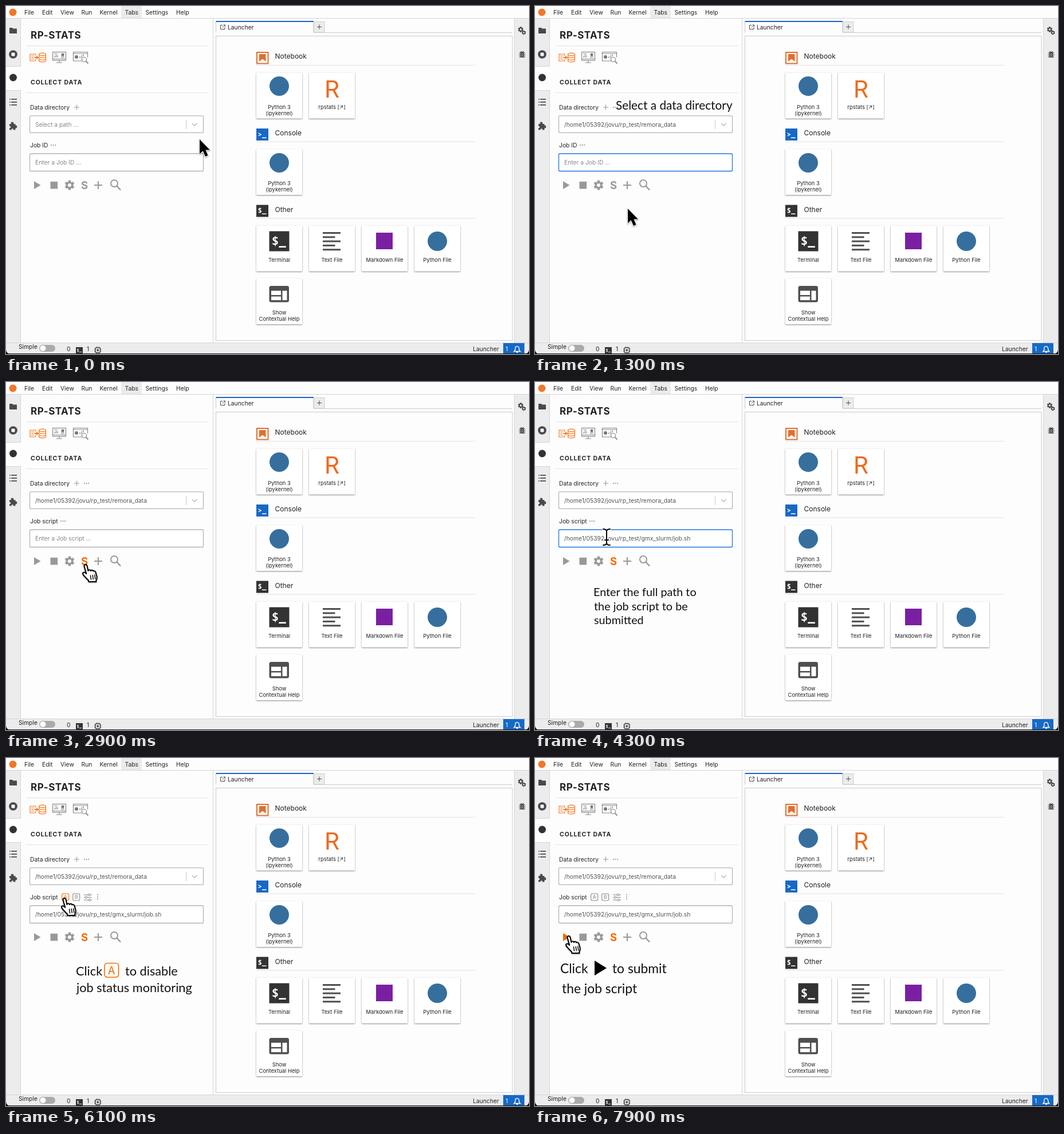
Recreate the animation shown at these times as an HTML page. Size 913x608 px, loop 8 s.

```html
<!DOCTYPE html>
<html lang="en">
<head>
<meta charset="utf-8">
<title>Collect data</title>
<style>
html, body { margin: 0; width: 100%; height: 100%; overflow: hidden; background: #fff; }
svg { display: block; width: 913px; height: 608px; }
text { font: 10.3px Inter, "Liberation Sans", sans-serif; fill: #222; white-space: pre; }
.note text { font-family: Lato, "Open Sans", sans-serif; fill: #111; }
.prompt { font-family: "Noto Sans Mono", monospace; font-weight: 600; fill: #fff; }
.mid { text-anchor: middle; }
.card { fill: #fff; filter: drop-shadow(0 1px 1.3px #0007); }
.rule { stroke: #e2e2e2; }
.box { fill: #fff; stroke: #b5b5b5; stroke-width: 1.3; }
.line { fill: none; stroke: #999; stroke-width: 1.4; }
</style>
</head>
<body>
<svg id="stage" viewBox="0 0 913 608"></svg>
<script>
const INK = '#4a4a4a', GREY = '#999', ORANGE = '#ef6c00', BLUE = '#1769c6', PAPER = '#fefdfe', BAR = '#ececec';
const HOME = '/home1/05392/jovu/rp_test/';

const rect = (x, y, w, h, fill, more = '') =>
  `<rect x="${x}" y="${y}" width="${w}" height="${h}" fill="${fill}" ${more}/>`;
const disc = (x, y, r, fill, more = '') =>
  `<circle cx="${x}" cy="${y}" r="${r}" fill="${fill}" ${more}/>`;
const path = (d, more = '') => `<path d="${d}" ${more}/>`;
const text = (x, y, s, style = '', more = '') =>
  `<text x="${x}" y="${y}" style="${style}" ${more}>${s}</text>`;
const group = (id, body, more = '') => `<g id="${id}" ${more}>${body}</g>`;
const rule = (x1, x2, y) => path(`M${x1} ${y}H${x2}`, 'class="rule"');
const dots = (x, y, r = 1, gap = 3.6, fill = '#888') =>
  [-gap, 0, gap].map(d => disc(x + d, y, r, fill)).join('');

function gear(x, y, r, fill, hole) {
  let teeth = '';
  for (let a = 0; a < 360; a += 60)
    teeth += rect(x - r * .26, y - r, r * .52, r * 2, fill, `transform="rotate(${a} ${x} ${y})"`);
  return teeth + disc(x, y, r * .76, fill) + disc(x, y, r * .36, hole);
}

function prompt(x, y, s, mark, fill) {
  return rect(x, y, s, s, fill) +
    text(x + s * .12, y + s * .7, mark, `font-size:${s * .6}px`, 'class="prompt"');
}

function card(x, y, lines, icon) {
  const base = lines.length > 1 ? 63 : 63.5;
  return rect(x, y, 80, 80, '#fff', 'class="card" rx="1"') + icon +
    lines.map((s, i) => text(x + 40, y + base + i * 11, s, 'font-size:9.4px', 'class="mid"')).join('');
}

function header(y, name, icon) {
  return icon + text(469.5, y + 12, name, 'font-size:12px') + rule(437, 819, y + 23.5);
}

const letterBox = (x, y, s, letter, color) =>
  rect(x, y, s, s, '#fff', `rx="${s * .2}" stroke="${color}" stroke-width="${s > 20 ? 1.6 : 1.1}"`) +
  text(x + s / 2, y + s * .78, letter, `font-size:${s * .76}px;fill:${color}`, 'class="mid"');

function frame() {
  const menu = [['File', 32], ['Edit', 63], ['View', 95], ['Run', 131.5], ['Kernel', 163.5],
    ['Tabs', 207.5], ['Settings', 243.5], ['Help', 297]];
  let s = rect(0, 0, 913, 608, PAPER) + rect(201, 0, 36, 21, '#ebebeb') +
    disc(12, 11, 6.5, '#f37726') + menu.map(([m, x]) => text(x, 15, m)).join('');
  // side bars and status bar
  s += rect(0, 22, 25.5, 566, BAR) + rect(0, 105, 26, 42, PAPER) +
    rect(887.5, 22, 26, 566, BAR) + rect(0, 588, 913, 19.5, BAR) +
    path('M0 21.5H913M25.5 22V105M0 105.5H26M0 147.5H26M25.5 147V588M361.5 22V588M887.5 22V588M0 588.5H913',
      'stroke="#d6d6d6" fill="none"');
  s += path('M6 38h5l1.5 1.6H19V48H6Z', `fill="${INK}"`) +
    disc(12.5, 84.5, 7.3, INK) + rect(9.6, 81.6, 5.8, 5.8, '#fff') + disc(12.5, 125, 6.5, '#333') +
    [163, 168, 173].map(y => rect(6, y - 1, 1.7, 1.7, INK) + rect(9, y - 1, 10, 1.7, INK)).join('') +
    rect(6, 206, 10.5, 10.5, INK, 'rx="1"') + disc(11, 205, 2.4, INK) + disc(17, 211, 2.4, INK) +
    disc(6.5, 211.5, 1.8, BAR) + disc(11.2, 216, 1.8, BAR);
  s += gear(898.5, 41, 4.6, INK, BAR) + gear(904, 46.5, 3.6, INK, BAR) +
    rect(898, 80, 6, 10, INK, 'rx="3"') +
    path('M896 82h10M895.5 85.5h11M896 89h10M898.5 79l1.5 2M903.5 79l-1.5 2', `stroke="${INK}" stroke-width="1.4"`) +
    path('M899.7 84h2.6M899.7 87h2.6', `stroke="${BAR}"`);
  s += text(22, 598.5, 'Simple') + rect(58, 592, 28, 12, '#aaa', 'rx="6"') + disc(64.5, 598, 5, '#fff') +
    text(106, 603, '0') + prompt(122, 596, 12, '$_', '#333') + text(141, 603, '1') +
    rect(156, 597, 8.5, 8.5, 'none', `stroke="${INK}" stroke-width="1.5" rx="1"`) + rect(158.6, 599.6, 3.3, 3.3, INK) +
    path('M158.5 595v2M162 595v2M158.5 605.5v2M162 605.5v2M154 599.5h2M154 603h2M164.5 599.5h2M164.5 603h2', `stroke="${INK}"`) +
    text(815, 603, 'Launcher') + rect(868, 589, 37, 19, BLUE) + text(872, 603, '1', 'fill:#fff') +
    path('M887 603.5q2-1.5 2-5.5a3.3 3.3 0 0 1 6.6 0q0 4 2 5.5ZM891 605h3', 'fill="none" stroke="#fff" stroke-width="1.3"');
  s += rect(0, 607, 913, 1, '#222') + path('M0 601q1 6 7 7H0ZM913 601q-1 6-7 7h7Z', 'fill="#000"');
  return s;
}

function launcher() {
  const kernel = (x, y) => disc(x, y, 17, '#366f9e');
  let s = path('M366.5 27V46.5M537 46.5H884M366.5 52.5H884V584.5H366.5Z', 'fill="none" stroke="#c9c9c9"') +
    rect(538, 27.5, 18, 18.5, BAR, 'stroke="#d0d0d0"') + path('M536.5 28V46', 'stroke="#c9c9c9"') +
    rect(366.5, 26, 170.5, 2, BLUE) + text(387, 41, 'Launcher') +
    path('M378 33.5h-3.5v7h7.5V37M379.5 33h3v3M382.5 33l-4.5 4.5', `fill="none" stroke="${INK}"`) +
    path('M543 36.5h8M547 32.5v8', `stroke="${INK}"`);
  s += header(80, 'Notebook', rect(438, 81, 19.5, 19.5, '#fff', 'stroke="#e46e2e" stroke-width="2"') +
    path('M442 84h11.5v13l-5.7-4.5L442 97Z', 'fill="#e46e2e"'));
  s += header(213.5, 'Console', prompt(437, 214, 21, '&gt;_', BLUE));
  s += header(347.5, 'Other', prompt(437, 347.5, 21, '$_', '#333'));
  s += card(437, 116.5, ['Python 3', '(ipykernel)'], kernel(477, 140)) +
    card(529, 116.5, ['rpstats [↗]'], text(569, 160, 'R', 'font:42px Roboto,sans-serif;fill:#ed6a1f', 'class="mid"')) +
    card(437, 250, ['Python 3', '(ipykernel)'], kernel(477, 274)) +
    card(437, 383.5, ['Terminal'], prompt(459.5, 393.5, 35, '$_', '#333')) +
    card(529, 383.5, ['Text File'], [395, 402.3, 409.6, 416.9, 424.2].map((y, i) =>
      rect(553, y, i % 2 ? 21.5 : 31, 3, '#4f4f4f')).join('')) +
    card(621, 383.5, ['Markdown File'], rect(646, 396, 29, 29, '#7b1fa2')) +
    card(713, 383.5, ['Python File'], kernel(753, 411)) +
    card(437, 476, ['Show', 'Contextual Help'], rect(459.5, 489, 34.5, 28.5, '#4f4f4f', 'rx="3.5"') +
      rect(463, 497.5, 17, 7.5, '#fff') + rect(463, 507.5, 17, 6.5, '#fff') + rect(482.5, 497.5, 8, 16.5, '#fff'));
  return s;
}

function panel() {
  const sheet = 'fill="none" stroke="#ef7d22" stroke-width="1.2"';
  const grey = 'fill="none" stroke="#888" stroke-width="1.2"';
  let s = text(43, 56.5, 'RP-STATS', 'font-size:17px;font-weight:650;letter-spacing:.5px') + rule(35, 354, 69.5) +
    text(43, 137, 'COLLECT DATA', 'font-size:10.5px;font-weight:650;letter-spacing:.9px') + rule(35, 354, 151.5);
  s += path('M51.5 87v-3H42v12h9.500v-3M44 87h5M44 90h4M44 93h5', sheet) +
    path('M49.500 89h3.500v-2.500l4 3.500-4 3.500v-2.500h-3.500Z', 'fill="#ef7d22"') +
    path('M57.500 84.500v11a6 2.300 0 0 0 12 0v-11M57.500 88a6 2.300 0 0 0 12 0M57.500 92a6 2.300 0 0 0 12 0'
      .replace(/a6 2/g, 'a6 2'), sheet) +
    `<ellipse cx="63.5" cy="84.5" rx="6" ry="2.3" ${sheet}/>`;
  s += rect(81.5, 80.5, 23, 14.5, '#fff', grey) +
    path('M81.5 92.5h23M93 95v3.5M88 99h10M85 90v-3M87.5 90v-5M90 90v-4M84 83.5h6M96 88h6M96 90h5', grey) + disc(99, 85, 2.5, '#777');
  s += path('M134 96h-16.5V80.5h25v9M117.5 83h25M129 91v-3M132 91v-5M135 88v-4', grey) + disc(123, 89, 3, '#777') +
    disc(136.5, 93.5, 4, '#fff', 'stroke="#888" stroke-width="1.2"') + path('M139.5 96.5l4 4', 'stroke="#888" stroke-width="1.8"');
  s += text(42, 181, 'Data directory') + path('M119 177h9M123.5 172.5v9', 'class="line" style="stroke-width:1.1"') +
    group('dirDots', dots(140.5, 177)) +
    rect(41.5, 191.8, 303, 29.5, '#fff', 'class="box" rx="2"') + text(51, 210.7, '', '', 'id="dir"') +
    path('M314.5 199V215', 'stroke="#ccc"') + path('M325 205l4.3 4.3 4.3-4.3', 'class="line" style="stroke:#bbb"');
  s += text(42, 247, '', '', 'id="jobLabel"') + group('idDots', dots(82.5, 243)) + group('jobDots', dots(99.5, 243)) +
    group('options', group('aOn', letterBox(97.7, 237, 12, 'A', ORANGE)) + group('aOff', letterBox(97.7, 237, 12, 'A', '#888')) +
      letterBox(116.7, 237, 12, 'B', '#888') +
      path('M136 239h14M136 243.5h14M136 248h14', 'stroke="#888" stroke-width="1.2"') +
      [[145, 239], [140, 243.5], [146, 248]].map(([x, y]) => disc(x, y, 1.8, '#fff', 'stroke="#888"')).join('') +
      [239, 242.7, 246.4].map(y => disc(160, y, 1, '#888')).join('')) +
    rect(41.5, 258, 303, 30.5, '#fff', 'class="box" rx="2" id="jobBox"') + text(51, 277, '', '', 'id="job"');
  s += path('M49 306l11.5 7-11.5 7Z', 'id="play"') + rect(77.5, 306.8, 12.6, 12.6, GREY) + gear(111, 313, 8.2, GREY, PAPER) +
    text(137, 319.5, 'S', 'font-size:18.5px;font-weight:700', 'class="mid" id="slurm"') +
    path('M154 313h14M161 306v14', 'class="line" style="stroke-width:2"') +
    disc(189, 310, 6, 'none', `stroke="${GREY}" stroke-width="2"`) + path('M193.5 314.5l6.5 7', `stroke="${GREY}" stroke-width="2.5"`);
  return s;
}

// Caption: start, end, font size, lines of [x, baseline, words], extra shapes
const captions = [
  [300, 2000, 20.8, [[141, 181, 'Select a data directory']], ''],
  [3300, 4550, 19.8, [[102, 374, 'Enter the full path to'], [103, 399, 'the job script to be'], [103, 423, 'submitted']], ''],
  [4600, 5500, 23, [[130, 377, 'Click'], [223, 377, 'to reveal'], [132, 408, 'more options']], dots(199.5, 371, 2.4, 8.5, '#111')],
  [5500, 7000, 21.7, [[122, 380, 'Click'], [208, 380, 'to disable'], [123, 409, 'job status monitoring']],
    letterBox(172, 358.5, 24.5, 'A', ORANGE)],
  [7100, 8000, 22.8, [[44, 376, 'Click'], [135, 376, 'to submit'], [47, 411, 'the job script']], path('M104 354l21 13-21 13Z')]
];
const captionArt = captions.map(([, , size, lines, extra], i) =>
  group('note' + i, `<g class="note">${lines.map(([x, y, s]) => text(x, y, s, `font-size:${size}px`)).join('')}</g>` + extra)).join('');

const round = 'stroke-linejoin="round" stroke-linecap="round"';
const shadow = 'style="filter:drop-shadow(0 1px 1px #0006)"';
const beam = 'M-6-14q6 0 6 4 0-4 6-4M0-10V10M-6 14q6 0 6-4 0 4 6 4M-3 5H3';
const cursorArt = group('cursor',
  group('arrow', path('M0 0V25.5L5.7 20.3 10 30 14.6 28 10.4 18.5H18Z',
    `fill="#000" stroke="#fff" stroke-width="2" paint-order="stroke" ${round}`), shadow) +
  group('hand', path('M-1.5 4c0-4 4.5-4 5.2 0l1.7 8c.5-2.5 4-2.2 4.5 0 1-2 4-1.5 4.3.6 1.5-1.4 4 0 4.3 2l2 7c.8 3-.3 5.5-1.300 7.500l.2 2H6.500l-.5-2.500c-3-3-7.500-7-9.500-10.500-1.500-3 1.500-4.600 4-2.600l1.800 1.500Z',
    `fill="#fff" stroke="#000" stroke-width="2" ${round}`) +
    path('M9.5 20l1 7M13.2 19.5l1 7M16.8 19l1 7', `stroke="#000" stroke-width="1.5" ${round}`), shadow) +
  group('beam', path(beam, `fill="none" stroke="#fff" stroke-width="4" ${round}`) +
    path(beam, `fill="none" stroke="#000" stroke-width="2" ${round}`)));

stage.innerHTML = frame() + launcher() + panel() + captionArt + cursorArt;

const $ = id => document.getElementById(id);
const show = (id, on) => { $(id).style.display = on ? '' : 'none'; };
const write = (id, s, fill) => { $(id).textContent = s; $(id).style.fill = fill; };

const route = [[0, 338, 233], [400, 325, 208], [650, 325, 208], [950, 200, 272], [1300, 162, 354], [1800, 162, 354],
  [2300, 138, 318], [2900, 138, 318], [3400, 125, 271], [4450, 125, 271], [4700, 100, 243], [5000, 100, 243],
  [6000, 101, 244], [6900, 101, 244], [7400, 58, 310], [8000, 58, 310]];

function pointer(t) {
  const i = route.findIndex(k => k[0] > t);
  const [t0, x0, y0] = route[i - 1], [t1, x1, y1] = route[i];
  const p = (t - t0) / (t1 - t0), e = p * p * (3 - 2 * p);
  return [x0 + (x1 - x0) * e, y0 + (y1 - y0) * e];
}

function draw(now) {
  const t = Math.floor(now % 8000 / 100) * 100;
  const [x, y] = pointer(t);
  const inBox = y > 258 && y < 288;
  const onButton = (y > 305 && y < 322) || (y > 237 && y < 250 && x < 112);
  $('cursor').setAttribute('transform', `translate(${x} ${y})`);
  show('beam', inBox);
  show('hand', !inBox && onButton);
  show('arrow', !inBox && !onButton);

  const chosen = t >= 700, script = t >= 2500, pasted = t >= 3700, open = t >= 4800, watch = t < 6700;
  const focus = (t >= 900 && t < 2300) || (t >= 3400 && t < 4700);
  write('dir', chosen ? HOME + 'remora_data' : 'Select a path ...', chosen ? '#555' : '#888');
  write('jobLabel', script ? 'Job script' : 'Job ID', '#222');
  write('job', pasted ? HOME + 'gmx_slurm/job.sh' : script ? 'Enter a Job script ...' : 'Enter a Job ID ...', pasted ? '#555' : '#888');
  $('jobBox').style.stroke = focus ? '#1f75d8' : '';
  $('slurm').style.fill = script ? ORANGE : GREY;
  $('play').style.fill = onButton && x < 62 ? ORANGE : GREY;
  show('dirDots', chosen);
  show('idDots', !script);
  show('jobDots', script && !open);
  show('options', open);
  show('aOn', watch);
  show('aOff', !watch);
  captions.forEach(([from, to], i) => show('note' + i, t >= from && t < to));
}

function tick() {
  draw(performance.now());
  requestAnimationFrame(tick);
}
tick();
</script>
</body>
</html>
```
